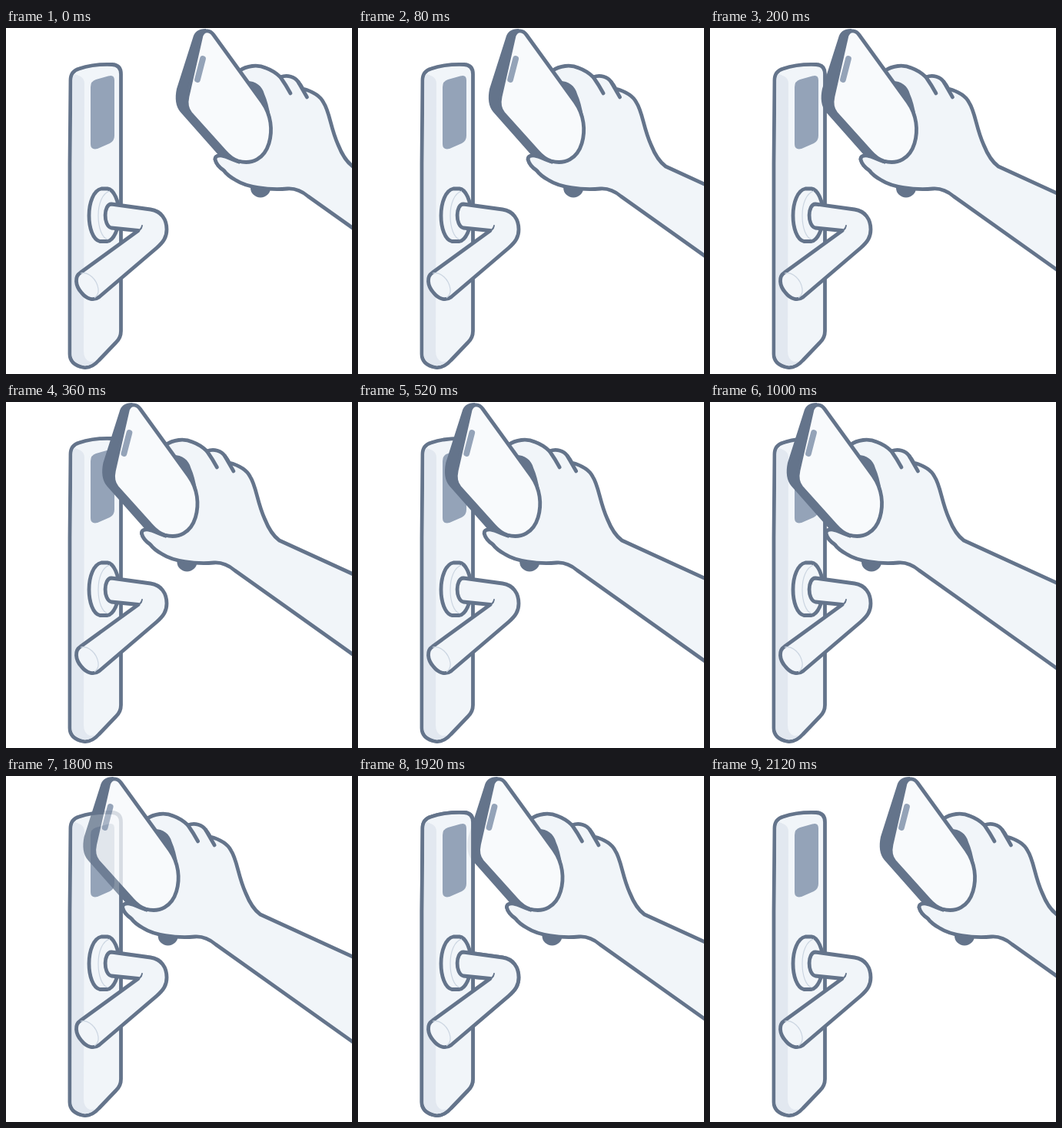
Animation of 450 by 450 pixels, one loop 2.64 s. Source, as an HTML page:

```html
<!DOCTYPE html>
<html lang="en">
<head>
<meta charset="utf-8">
<title>Phone unlocking a door</title>
<style>
  html, body { margin: 0; height: 100%; overflow: hidden; background: #fff; }
  svg { display: block; width: 100%; height: 100%; }
  .line { stroke: #64748b; stroke-width: 4.8; stroke-linecap: round; stroke-linejoin: round; }
  .thin { fill: none; stroke: #cbd5e1; stroke-width: 1.2; }
  .soft { fill: #f1f5f9; }
  .none { fill: none; }
  .dark { fill: #64748b; }
  .grey { fill: #94a3b8; }
</style>
</head>
<body>
<svg viewBox="0 0 450 450">
  <g id="lock">
    <path class="soft line" d="M84 68 C84 59 88 55 95 53 C108 48.5 125 47 138 47.5 Q149.5 48 149.5 60 V394 Q149.5 403 143 409 L121 432 Q111 443 101 441.5 Q83 438 83 424 V176 Z"/>
    <path fill="#e2e8f0" d="M86.3 68 Q86.3 62 89 60 Q102 63 102 72 L101 420 Q101 431 109 434 Q113 434 116 433 Q109 440 101 439 Q85.4 435 85.4 424 Z"/>
    <path class="grey" d="M110 77 Q110 69 117 67 L133 62.5 Q141 60 141 68 V140 Q141 147 135 150 L119 157 Q110 159 110 151 Z"/>
    <path class="soft line" d="M124 209 H132 C140 210 147 224 147 243 C147 262 140 276 132 277.5 H122 C113 275 108 260 108 244 C108 227 114 211 124 209 Z"/>
    <path class="thin" d="M135 212 C125 215 120 229 120 244 C120 260 125 273 132 275"/>
    <path class="soft line" d="M137 229 L188 236 C202 238 209 249 209 262 C209 272 205 278 196 286 L121 350 C114 355 105 353 98 344 C90 335 89 323 97 318 L172 263.5 L137 260 C126 257 127 229 137 229 Z"/>
    <path class="line none" style="stroke-width:1.8" d="M168 264 Q176 264 177 257"/>
    <path class="thin" d="M97 319 C108 317 118 327 120 339 Q121 347 115 351"/>
  </g>
  <g id="hand">
    <path class="dark" d="M260 1 C250 1 245 5 243 13 L222 79 C219.5 91 220.5 102 227 109.5 L277 166 L300 172 L275 60 Z"/>
    <ellipse class="dark" cx="331" cy="208" rx="13" ry="12.5"/>
    <path class="soft line" d="M303 56 C313 49 327 47 338 52 Q349 56 357 64 C366 60 376 64 380 70 Q384 75 386 79 C397 82 408 87 413 97 C421 109 422 130 432 152 Q440 172 451 180 L580 239 V352 L393 219 Q380 208 366 209 C340 211 313 207 299 198 Q288 192 283 185 Q274 179 272 171 Q272 165 281 166 C288 167 294 172 303 174 L325 130 Z"/>
    <path class="line none" d="M357 64 Q364 74 370 85 M380 70 L391.5 90"/>
    <path class="dark" d="M313 69 C325 69 333 75 336 86 Q341 97 344 116 L330 105 Z"/>
    <path class="line" fill="#f8fafc" d="M254 10 C257 2 265 2 270 9 L333 96 C345 113 347 133 342 150 C336 170 320 178 302 173 Q293 170 285 161 L240 111 Q233 103 236 89 Z"/>
    <path class="none" stroke="#94a3b8" stroke-width="7.8" stroke-linecap="round" d="M256 40 L249 67"/>
    <path class="soft line" d="M283 185 Q274 179 272 171 Q272 165 281 166 C288 167 294 172 303 174"/>
  </g>
  <use id="cover" href="#lock"/>
</svg>
<script>
  const LOOP = 2640, STEP = 40, TRAVEL = 121;
  const hand = document.getElementById('hand');
  const cover = document.getElementById('cover');

  function bezier(x1, y1, x2, y2) {
    const at = (s, a, b) => 3 * s * (1 - s) ** 2 * a + 3 * s * s * (1 - s) * b + s ** 3;
    return x => {
      let lo = 0, hi = 1;
      for (let i = 0; i < 24; i++) {
        const mid = (lo + hi) / 2;
        if (at(mid, x1, x2) < x) lo = mid; else hi = mid;
      }
      return at(lo, y1, y2);
    };
  }
  const approach = bezier(0, .62, .45, 1);
  const retreat = p => p < .5 ? 4 * p ** 3 : 1 - 4 * (1 - p) ** 3;
  const clamp = v => Math.min(1, Math.max(0, v));

  function draw(now) {
    const t = Math.floor(now % LOOP / STEP) * STEP;
    const back = clamp((t - 1760) / 360);
    const reach = t < 1000 ? approach(t / 1000) : 1 - retreat(back);
    hand.setAttribute('transform', `translate(${-TRAVEL * reach})`);
    // The lock fades in over the phone as the hand withdraws.
    cover.setAttribute('opacity', clamp(back * 2));
    cover.setAttribute('visibility', back > 0 && back < 1 ? 'visible' : 'hidden');
  }

  const start = performance.now();
  function tick() {
    draw(performance.now() - start);
    requestAnimationFrame(tick);
  }
  tick();
</script>
</body>
</html>
```
